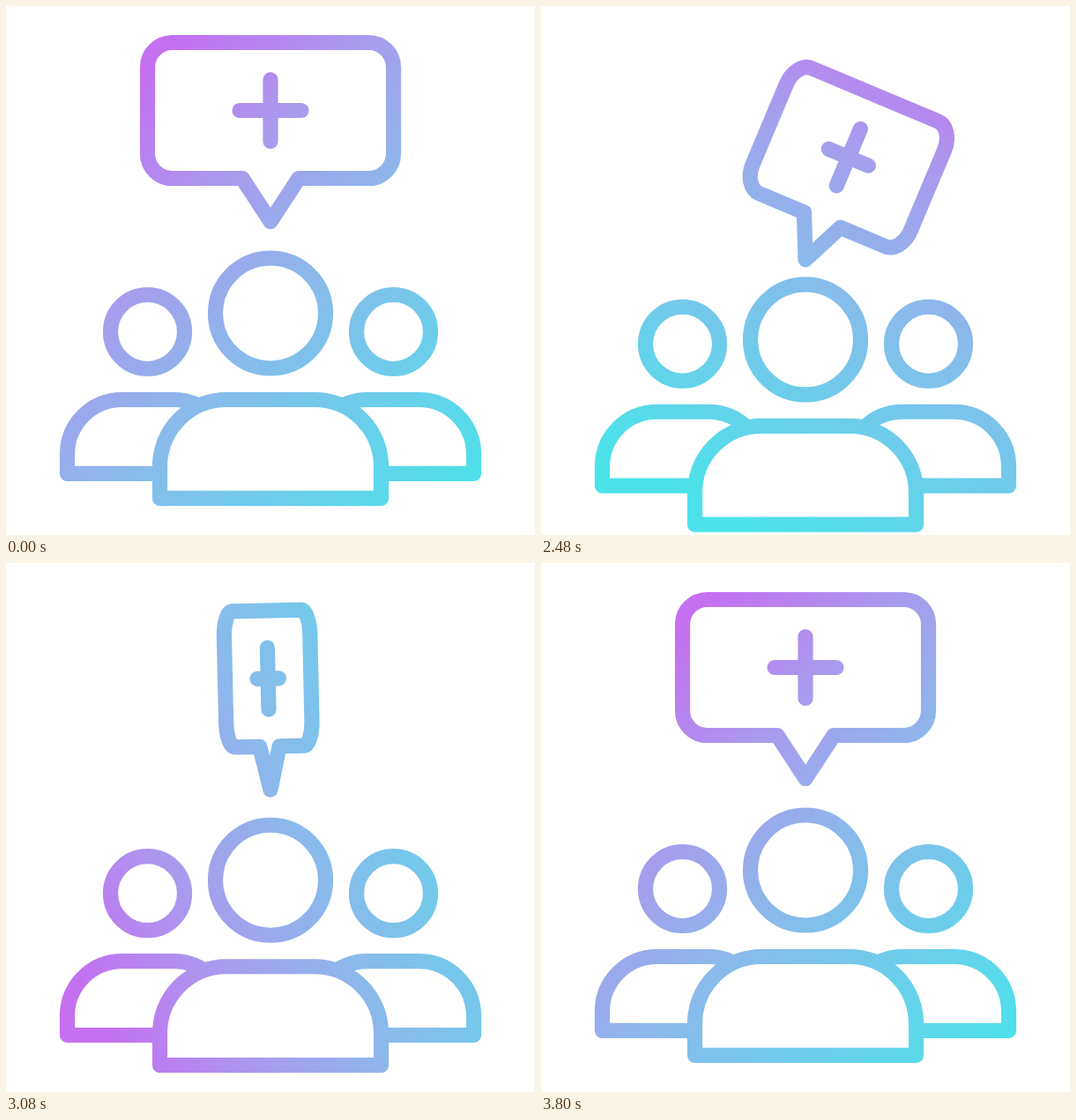
Recreate the animation shown at these times as an HTML page. Size 600x600 px, loop 3.83 s.

```html
<!DOCTYPE html>
<html lang="en">
<head>
<meta charset="utf-8">
<title>People and message</title>
<style>
  html, body { margin: 0; width: 100%; height: 100%; overflow: hidden; background: #fff; }
  svg { display: block; width: 100%; height: 100%; }
  .line { fill: none; stroke: #fff; stroke-width: 17.2; stroke-linecap: round; stroke-linejoin: round; }
</style>
</head>
<body>
<svg viewBox="0 0 600 600">
  <defs>
    <linearGradient id="tint" gradientUnits="userSpaceOnUse">
      <stop offset="0" stop-color="#c470f0"/>
      <stop offset=".25" stop-color="#a99aed"/>
      <stop offset=".5" stop-color="#8abaeb"/>
      <stop offset="1" stop-color="#4ce2ea"/>
    </linearGradient>
    <mask id="drawing" maskUnits="userSpaceOnUse" x="0" y="0" width="600" height="600">
      <g class="line">
        <g id="sides">
          <g id="side">
            <circle cx="160.5" cy="369.5" r="42"/>
            <path d="M252 530.3H69.5V508.5a62 62 0 0 1 62-62H190a62 62 0 0 1 62 62"/>
          </g>
          <use href="#side" transform="matrix(-1 0 0 1 600 0)"/>
        </g>
        <g id="middle">
          <circle cx="300" cy="348.5" r="62.5"/>
          <path fill="#000" d="M174.5 558.3V522a75.5 75.5 0 0 1 75.5-75.5H350a75.5 75.5 0 0 1 75.5 75.5V558.3Z"/>
        </g>
        <path id="bubble"/>
      </g>
    </mask>
  </defs>
  <rect width="600" height="600" fill="url(#tint)" mask="url(#drawing)"/>
</svg>
<script>
const LOOP = 3830, START = 2000, STEP = 30, LAST = 60;
const $ = id => document.getElementById(id);
const tint = $('tint'), bubble = $('bubble');

// Cubic timing curve with control points (a, 0) and (b, 1).
function ease(x, a, b) {
  let lo = 0, hi = 1;
  for (let i = 0; i < 24; i++) {
    const u = (lo + hi) / 2, v = 1 - u;
    if (3 * v * v * u * a + 3 * v * u * u * b + u * u * u < x) lo = u; else hi = u;
  }
  return lo * lo * (3 - 2 * lo);
}

// Each key: [step, value, a, b]; a and b shape the approach to that key.
function track(n, keys) {
  if (n <= keys[0][0]) return keys[0][1];
  for (let i = 1; i < keys.length; i++) {
    const [from, start] = keys[i - 1], [to, end, a = 1 / 3, b = 2 / 3] = keys[i];
    if (n < to) return start + (end - start) * ease((n - from) / (to - from), a, b);
  }
  return keys[keys.length - 1][1];
}

const TURN = [[0, 1], [20.5, -1, .18, .78], [60, 1, .22, .22]];
const TILT = [[0, 0], [23.5, 30], [40, -6.7], [60, 0]];
const DROP = [[0, 0], [20, 45, .42, .35], [60, 0, .33, .1]];
const BOB = [[0, 0], [20, 31, .38, .34], [60, 0, .36, .2]];
const SPIN = [[0, 0], [20, 82], [60, 360, .2, .1]];

// Speech bubble around its tip at (0, 0), squeezed sideways by s.
function bubblePath(s) {
  const p = (x, y) => `${(x * s).toFixed(2)} ${y.toFixed(2)} `;
  const w = 139.5, top = -203, low = -49, r = 28, k = r * .448;
  const corner = (x, y, dx0, dy0, dx1, dy1) =>
    'L' + p(x + dx0 * r, y + dy0 * r) +
    'C' + p(x + dx0 * k, y + dy0 * k) + p(x + dx1 * k, y + dy1 * k) + p(x + dx1 * r, y + dy1 * r);
  return 'M' + p(0, 0) + 'L' + p(-32, low) +
    corner(-w, low, 1, 0, 0, -1) + corner(-w, top, 0, 1, 1, 0) +
    corner(w, top, -1, 0, 0, 1) + corner(w, low, 0, -1, -1, 0) +
    'L' + p(32, low) + 'Z' +
    'M' + p(0, -161) + 'L' + p(0, -91) + 'M' + p(-35, -126) + 'L' + p(35, -126);
}

function paintGradient(spin) {
  const angle = (44 + spin) * Math.PI / 180, half = 300;
  const shift = .5 + .5 * Math.cos(spin * Math.PI / 180);
  const x = 300 + 52 * shift, y = 300 + 6 * shift;
  const dx = half * Math.cos(angle), dy = half * Math.sin(angle);
  tint.setAttribute('x1', x - dx);
  tint.setAttribute('y1', y - dy);
  tint.setAttribute('x2', x + dx);
  tint.setAttribute('y2', y + dy);
}

function draw(time) {
  const n = Math.min(LAST, Math.max(0, Math.floor((time % LOOP - START) / STEP + .001)));
  const bob = track(n, BOB);
  $('middle').setAttribute('transform', `translate(0 ${bob})`);
  $('sides').setAttribute('transform', `translate(0 ${bob * .46})`);
  bubble.setAttribute('d', bubblePath(track(n, TURN)));
  bubble.setAttribute('transform', `translate(300 ${244.5 + track(n, DROP)}) rotate(${track(n, TILT)})`);
  paintGradient(track(n, SPIN));
}

const origin = performance.now();
function tick() {
  draw(performance.now() - origin);
  requestAnimationFrame(tick);
}
tick();
</script>
</body>
</html>
```
